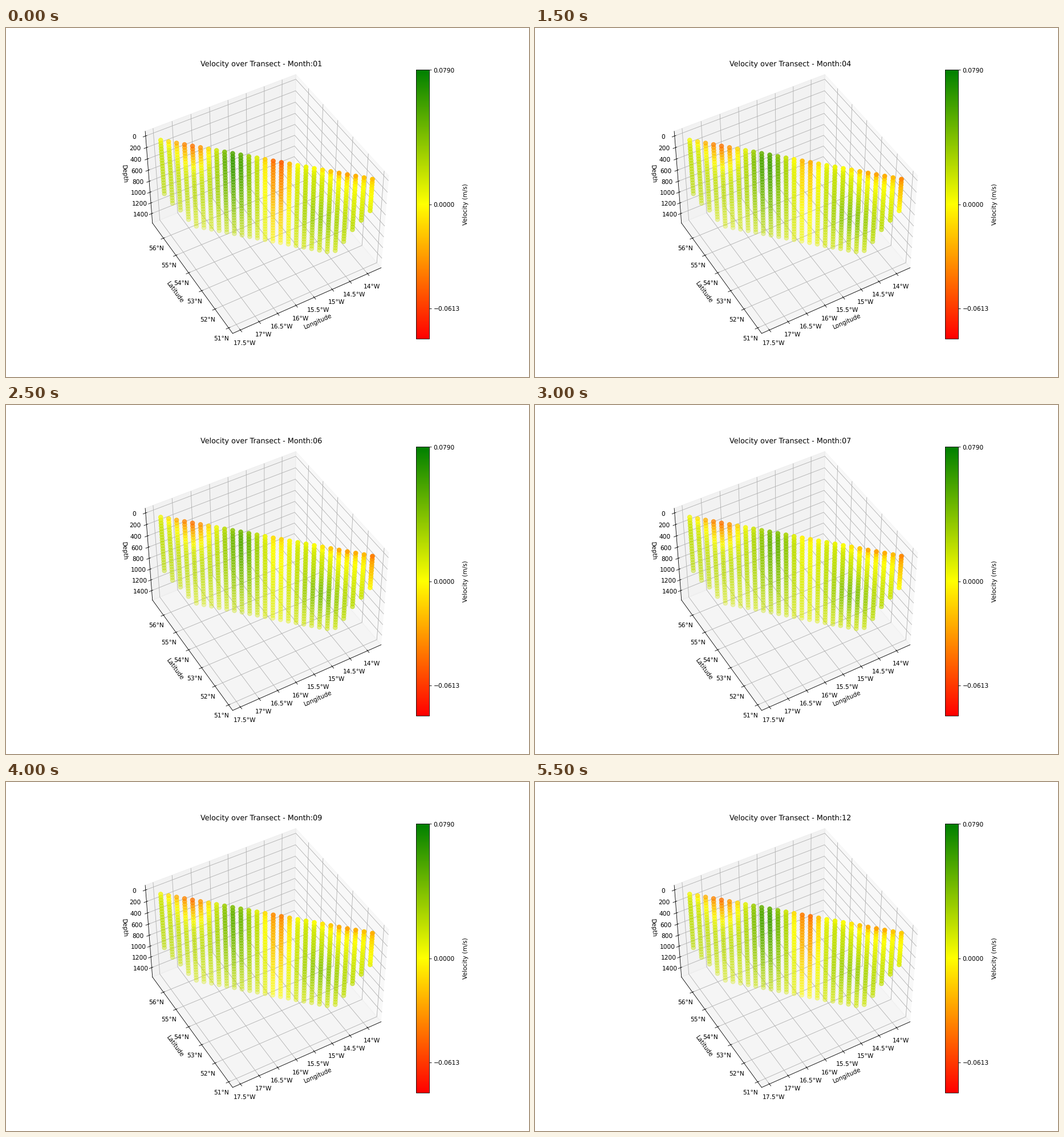
A matplotlib script for the animation above (6 s loop, 917 by 611 pixels).

```python
import numpy as np
import matplotlib.pyplot as plt
from matplotlib.animation import FuncAnimation
from matplotlib.cm import ScalarMappable
from matplotlib.colors import LinearSegmentedColormap, Normalize

WIDTH, HEIGHT, DPI = 917, 611, 76.4
VMAX = 0.079
MONTHS = 12
plt.rcParams.update({"font.family": "DejaVu Sans", "text.hinting": "none"})

# Evenly spaced stations; 50 m bins reach the sea bed, which rises at both ends
STATIONS, MAX_LEVELS, BIN = 27, 30, 50
column = np.arange(STATIONS)
bed = np.minimum(20 + 2.7 * column, 12 + 4.2 * column[::-1])
levels = np.rint(np.minimum(bed, MAX_LEVELS)).astype(int)
station = np.repeat(column, levels)
depth = BIN * np.concatenate([np.arange(n) + 0.5 for n in levels])
lon = np.interp(station, [0, STATIONS - 1], [-17.445, -13.872])
lat = np.interp(station, [0, STATIONS - 1], [56.51, 51.105])


def bump(x, centre, width):
    return np.exp(-((x - centre) / width) ** 2)


def cycle(month, peak, period=MONTHS):
    return np.cos(2 * np.pi * (month - peak) / period)


def core(strength, centre, width, reach, level=0):
    """A current core across the transect, centred at a depth level."""
    return strength * bump(station, centre, width) * bump(depth, level, reach)


def velocity(month):
    meander = cycle(month, 2.8, period=4)
    flow = 0.27 * np.interp(depth, [900, 1475], [1, 0.65])
    flow += core(-0.68, 4, 2.3, 400)
    flow += core(0.46 + 0.1 * cycle(month, 2), 9.85 + 0.7 * meander, 2, 1050)
    flow += core(-0.53 - 0.17 * cycle(month, 12) + 0.15 * meander, 14.6, 1.7, 1300)
    flow += core(0.22 - 0.06 * cycle(month, 12), 20.3, 2.3, 400, level=850)
    flow += core(-0.28, 23.5, 4, 600)
    flow += core(-0.32 - 0.2 * cycle(month, 5.5), 26.5, 1, 700)
    drift = 0.12 + 0.24 * bump(station, 22.5, 3) + 0.15 * bump(station, 1.5, 1.5)
    return VMAX * (flow - drift * np.exp(-(depth - BIN / 2) / 80))


cmap = LinearSegmentedColormap.from_list("flow", ["red", "yellow", "green"])
norm = Normalize(-VMAX, VMAX)

fig = plt.figure(figsize=((WIDTH + 1e-6) / DPI, (HEIGHT + 1e-6) / DPI), dpi=DPI)
ax = fig.add_subplot(projection="3d")
ax.view_init(elev=45, azim=-120)
ax.set_xlim(-17.705, -13.612)
ax.set_ylim(50.711, 56.904)
ax.set_zlim(-1580.7, 80.7)

west = np.arange(17.5, 13.9, -0.5)
north = np.arange(51, 57)
down = np.arange(0, 1401, 200)
ax.set_xticks(-west, [f"{w:g}°W" for w in west])
ax.set_yticks(north, [f"{n}°N" for n in north])
ax.set_zticks(-down, [str(d) for d in down])
ax.set_xlabel("Longitude")
ax.set_ylabel("Latitude")
ax.set_zlabel("Depth")
title = ax.set_title("")

bar = fig.colorbar(ScalarMappable(norm, cmap), ax=ax, label="Velocity (m/s)")
bar.set_ticks([-0.0613, 0, VMAX], labels=["\u22120.0613", "0.0000", "0.0790"])

clouds = []


def update(index):
    while clouds:
        clouds.pop().remove()
    month = index + 1
    colors = cmap(norm(velocity(month)))
    clouds.append(ax.scatter(lon, lat, -depth, s=50, c=colors))
    title.set_text(f"Velocity over Transect - Month:{month:02d}")
    return clouds + [title]


anim = FuncAnimation(fig, update, frames=MONTHS, interval=500, repeat=True)
plt.show()
```
